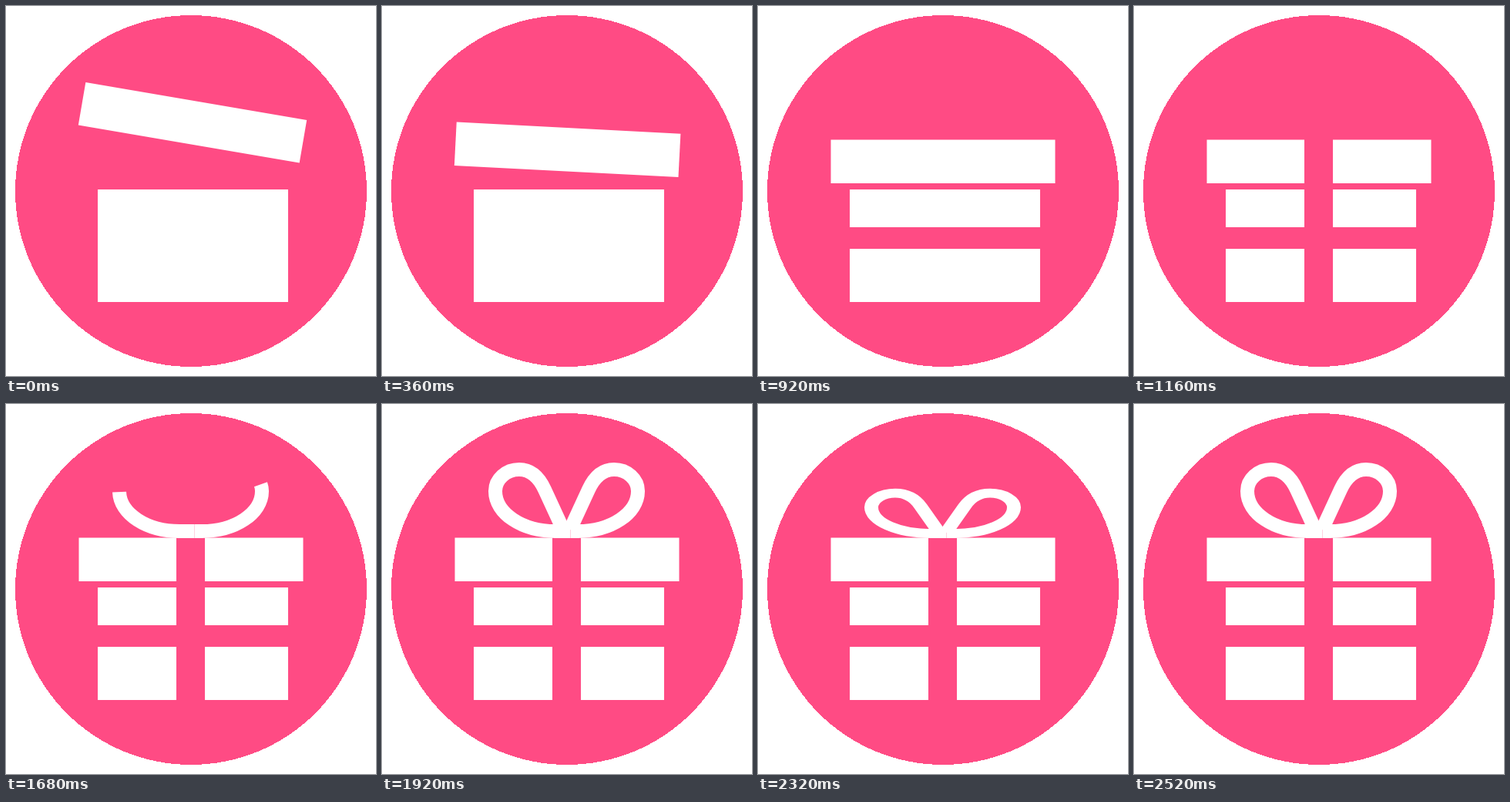
Animation, 480 px wide and 480 px high, one loop 3000 ms. Source, as an HTML page:

```html
<!DOCTYPE html>
<html lang="en">
<head>
<meta charset="utf-8">
<title>Gift box</title>
<style>
  html, body { margin: 0; width: 100%; height: 100%; overflow: hidden; background: #fff; }
  svg { display: block; width: 100%; height: 100%; }
  .pink { fill: #ff4b84; }
  .white { fill: #fff; }
  #bow path { fill: none; stroke: #fff; stroke-width: 18; }
</style>
</head>
<body>
<svg viewBox="0 0 480 480">
  <circle class="pink" cx="240" cy="240" r="228" shape-rendering="crispEdges"/>
  <rect class="white" x="119" y="238" width="247" height="146"/>
  <rect id="lid" class="white" x="-145.5" y="-28.25" width="291" height="56.5"/>
  <rect id="band" class="pink" x="119" y="287" height="28"/>
  <rect id="ribbon" class="pink" x="221" y="173" width="37"/>
  <g id="bow">
    <path d="M244.5 165H225C182 165 147 142 147 113C147 97.5 161 85 178 85C195 85 205 98 211 111L235 163"/>
    <path d="M244.5 165H254C297 165 332 142 332 113C332 97.5 318 85 301 85C284 85 274 98 268 111L244 163"/>
  </g>
</svg>
<script>
const LOOP = 3000, TICK = 40;
const BOW_BASE = 174;
const byId = id => document.getElementById(id);
const lid = byId('lid'), band = byId('band'), ribbon = byId('ribbon'), bow = byId('bow');
const strands = [...bow.children].map(path => ({ path, length: path.getTotalLength() }));
const longest = Math.max(...strands.map(s => s.length));

const progress = (t, start, end) => Math.min(1, Math.max(0, (t - start) / (end - start)));
const mix = (a, b, p) => a + (b - a) * p;

function draw(t) {
  const close = progress(t, 178, 440);
  lid.setAttribute('transform',
    `translate(${mix(242, 240, close)} ${mix(151.25, 201.75, close)}) rotate(${mix(9.7, 0, close)})`);

  band.setAttribute('width', 247 * progress(t, 710, 920));
  ribbon.setAttribute('height', 211 * progress(t, 960, 1160));

  // Both strands grow at the same speed from a shared point on the lid.
  const drawn = longest * progress(t, 1481, 1925);
  for (const { path, length } of strands) {
    path.style.strokeDasharray = drawn >= length ? 'none' : `${drawn} ${length + 10}`;
  }
  bow.style.visibility = drawn > 0 ? 'visible' : 'hidden';

  // The finished bow squashes towards the lid and springs back.
  const squash = 1 - 0.35 * Math.sin(Math.PI * progress(t, 2160, 2520));
  bow.setAttribute('transform', `translate(0 ${BOW_BASE * (1 - squash)}) scale(1 ${squash})`);
}

const start = performance.now();
function frame() {
  const t = (performance.now() - start) % LOOP;
  draw(Math.floor(t / TICK) * TICK);
  requestAnimationFrame(frame);
}
frame();
</script>
</body>
</html>
```
